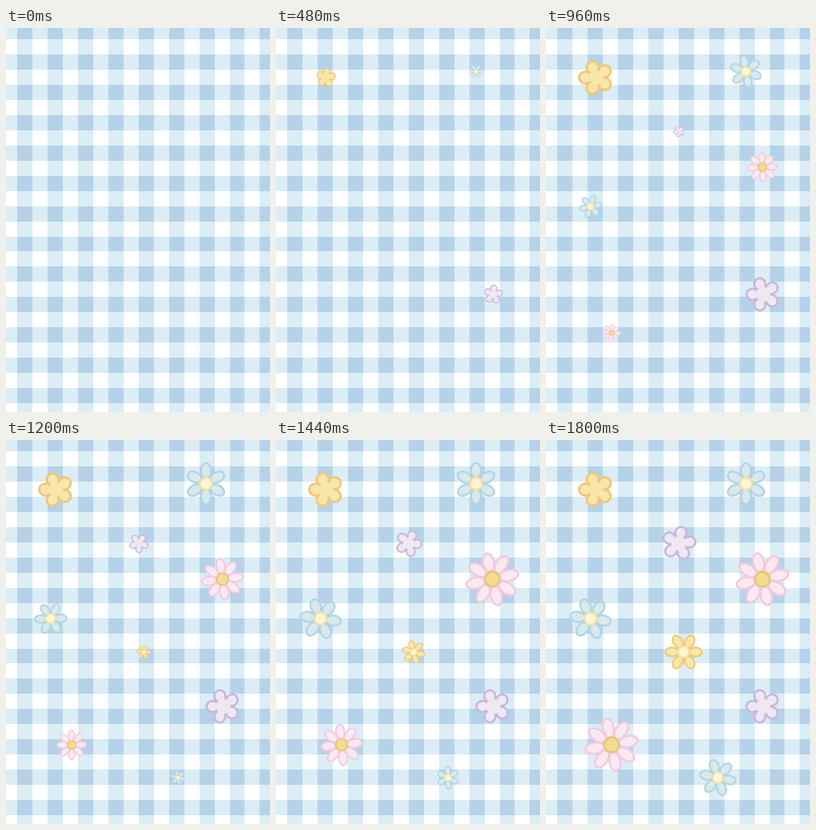
Write an HTML page that moves like this. It is 330x480 px and loops after 1920 ms.

```html
<!DOCTYPE html>
<html lang="en">
<head>
<meta charset="utf-8">
<title>Gingham flowers</title>
<style>
  html, body { margin: 0; width: 100%; height: 100%; overflow: hidden; background: #fff; }
  svg { display: block; width: 100%; height: 100%; }
</style>
</head>
<body>
<svg id="stage" viewBox="0 0 330 480"></svg>
<script>
const NS = 'http://www.w3.org/2000/svg';
const stage = document.getElementById('stage');
const LOOP = 1920, STEP = 120, GROW = 9, CELL = 37.93;

function add(parent, tag, attrs) {
  const el = document.createElementNS(NS, tag);
  for (const key in attrs) el.setAttribute(key, attrs[key]);
  parent.appendChild(el);
  return el;
}

function rect(x, y, width, height, fill) {
  add(stage, 'rect', { x, y, width, height, fill, 'shape-rendering': 'crispEdges' });
}

function gingham() {
  const half = CELL / 2, cols = [], rows = [];
  for (let x = 14; x < 330; x += CELL) cols.push(x);
  for (let y = -5; y < 480; y += CELL) rows.push(y);
  rect(0, 0, 330, 480, '#fff');
  cols.forEach(x => rect(x, 0, half, 480, '#dbedf5'));
  rows.forEach(y => rect(0, y, 330, half, '#dbedf5'));
  cols.forEach(x => rows.forEach(y => rect(x, y, half, half, '#b5d2e9')));
}

// Petal: cx, rx, ry describe an ellipse pointing along +x.
// Spin: degrees turned per step while growing.
const round = { petals: 5, cx: 13.2, rx: 7.8, ry: 7.4, line: 3, spin: 30, joined: true };
const daisy = { petals: 6, cx: 16.2, rx: 9.4, ry: 6.3, line: 2.4, spin: -25, core: 7.6, coreLine: 2.2 };
const kinds = {
  butter: { ...round, fill: '#f7e7a9', edge: '#f2c67c' },
  lilac: { ...round, rx: 7.6, ry: 6.9, line: 2.8, fill: '#efe7f2', edge: '#c8b8db' },
  sky: { ...daisy, fill: '#d9e9ec', edge: '#b1d5e5', coreFill: '#fdf5d3', coreEdge: '#f5e19c' },
  gold: { ...daisy, cx: 16.6, fill: '#f8e7a8', edge: '#f2c77e', coreFill: '#fdf6cf', coreEdge: '#f8e49b' },
  pink: { petals: 8, cx: 21.4, rx: 11.8, ry: 6.9, line: 2.5, spin: -25, core: 9.2, coreLine: 2.4,
          fill: '#fae9f1', edge: '#f1cadf', coreFill: '#f2de90', coreEdge: '#e9c56f' }
};

function drawFlower(kind) {
  const k = kinds[kind], g = add(stage, 'g', {});
  const petal = attrs => {
    for (let i = 0; i < k.petals; i++) {
      add(g, 'ellipse', { cx: k.cx, rx: k.rx, ry: k.ry, transform: `rotate(${i * 360 / k.petals})`, ...attrs });
    }
  };
  petal({ fill: k.fill, stroke: k.edge, 'stroke-width': k.line });
  if (k.joined) {
    petal({ fill: k.fill, rx: k.rx - k.line / 2, ry: k.ry - k.line / 2 });
    add(g, 'circle', { r: 9.2, fill: k.fill });
  }
  if (k.core) {
    add(g, 'circle', { r: k.core, fill: k.coreFill, stroke: k.coreEdge, 'stroke-width': k.coreLine });
  }
  return g;
}

// kind, x, y, step at which growth begins, resting angle
const flowers = [
  ['butter', 62.5, 62, -1, -108],
  ['lilac', 271.5, 333, -1, -108],
  ['sky', 250, 54.5, 1, -90],
  ['pink', 270.5, 174, 3, -103],
  ['sky', 55.7, 223.3, 3, -112],
  ['lilac', 166, 129.2, 5, -79],
  ['pink', 82, 381, 5, -101],
  ['gold', 172, 265, 7, -85],
  ['sky', 215, 422, 7, -133]
];

gingham();
const garden = flowers.map(([kind, x, y, start, rest]) =>
  ({ x, y, start, rest, spin: kinds[kind].spin, el: drawFlower(kind) }));

function render(time) {
  const step = Math.floor((time % LOOP) / STEP);
  for (const f of garden) {
    const age = Math.min(step - f.start, GROW);
    const shown = age >= 2;
    f.el.setAttribute('visibility', shown ? 'visible' : 'hidden');
    if (!shown) continue;
    const angle = f.rest - (GROW - age) * f.spin;
    f.el.setAttribute('transform', `translate(${f.x} ${f.y}) rotate(${angle}) scale(${age / GROW})`);
  }
}

const begin = performance.now();
function tick() {
  render(performance.now() - begin);
  requestAnimationFrame(tick);
}
tick();
</script>
</body>
</html>
```
